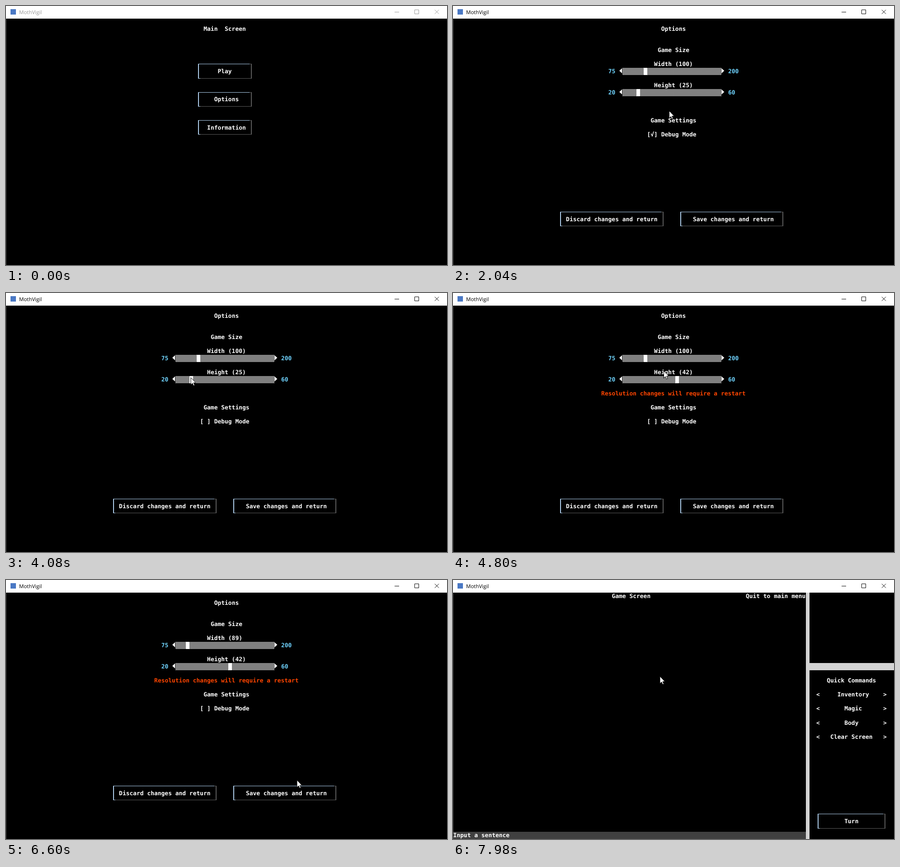
These frames come from a looping animation (976 by 574 pixels, 8000 ms). An HTML page:

```html
<!DOCTYPE html>
<html lang="en">
<head>
<meta charset="utf-8">
<title>Game options</title>
<style>
  html, body { margin: 0; width: 100%; height: 100%; overflow: hidden; background: #000; }
  svg { display: block; width: 976px; height: 574px; }
  .cell { font: bold 12.957px "DejaVu Sans Mono", monospace; white-space: pre; text-rendering: geometricPrecision; }
  .caption { font: 11.5px "Open Sans", sans-serif; text-rendering: geometricPrecision; }
  rect { shape-rendering: crispEdges; }
</style>
</head>
<body>
<svg id="stage" viewBox="0 0 976 574" xmlns="http://www.w3.org/2000/svg">
  <defs>
    <pattern id="shade" width="2" height="2" patternUnits="userSpaceOnUse">
      <path d="M0 0h1v1h-1zM1 1h1v1h-1z" fill="#fff" shape-rendering="crispEdges"/>
    </pattern>
  </defs>
  <rect width="976" height="574"/>
  <g id="screens"></g>
  <rect y="28" width="1" height="546" fill="#3a3a3a"/>
  <rect width="976" height="28" fill="#fff"/>
  <rect x="10" y="7" width="12" height="12" fill="#4a78c4"/>
  <g id="bar">
    <text class="caption" x="29" y="17.5">MothVigil</text>
    <path d="M860 13.5h10M904.5 8.5h9v9h-9zM949 8.5l9 9M958 8.5l-9 9" fill="none" stroke="currentColor"/>
  </g>
  <path id="cursor" d="M.5.5V16.5L4.2 13L6.5 18.5L9 17.5L6.7 12H11.5Z" fill="#fff" stroke="#000"/>
</svg>
<script>
const LOOP = 8000, STEP = 60;
const CW = 7.8, CH = 15.6, LEFT = 0.5, TOP = 28;
const LIGHT = '#b0d0ee', DIM = '#5c5c5c', CYAN = '#6fd3ff';
const $ = id => document.getElementById(id);
const colX = c => LEFT + c * CW;
const rowY = r => TOP + r * CH;

function add(parent, tag, attrs, content) {
  const el = document.createElementNS('http://www.w3.org/2000/svg', tag);
  for (const key in attrs) el.setAttribute(key, attrs[key]);
  if (content) el.textContent = content;
  parent.appendChild(el);
  return el;
}

function show(el, on) { el.style.display = on ? '' : 'none'; }

function label(g, col, row, str, fill = '#fff') {
  return add(g, 'text', { class: 'cell', x: colX(col), y: rowY(row) + 11.7, fill }, str);
}

function box(g, x, y, width, height, fill) {
  return add(g, 'rect', { x, y, width, height, fill });
}

// Bevelled button; returns a function that sets its pressed look.
function button(g, left, right, row, textCol, str) {
  const x1 = Math.round(colX(left) + 2.9), x2 = Math.round(colX(right) + 2.9);
  const y1 = Math.round(rowY(row - 1) + 6.8), y2 = Math.round(rowY(row + 1) + 6.8);
  const path = (d, width) => add(g, 'path', {
    d, 'stroke-width': width, fill: 'none', 'shape-rendering': 'crispEdges' });
  const lit = [
    path(`M${x1} ${y1 + .5}H${x2 - 3}M${x1} ${y2 + .5}h5`, 1),
    path(`M${x1 + 1} ${y1}V${y2 + 1}`, 2)];
  const dark = [
    path(`M${x2 - 3} ${y1 + .5}H${x2 + 2}M${x1 + 5} ${y2 + .5}H${x2 + 2}`, 1),
    path(`M${x2 + 1} ${y1}V${y2 + 1}`, 2)];
  label(g, textCol, row, str);
  return pressed => {
    lit.forEach(p => p.setAttribute('stroke', pressed ? DIM : LIGHT));
    dark.forEach(p => p.setAttribute('stroke', pressed ? LIGHT : DIM));
  };
}

// Slider with a 28-cell track; returns a function that sets its value.
function slider(g, row, name, min, max) {
  const title = label(g, 57, row - 1, '');
  const y = rowY(row), span = 28, first = 48;
  const arrow = (x, dir) => add(g, 'path', {
    d: `M${x} ${y + 6.4}l${6 * dir} -5.6v11.2z`, fill: '#fff' });
  label(g, 44, row, String(min), CYAN);
  label(g, 78, row, String(max), CYAN);
  arrow(colX(47) + 1, 1);
  arrow(colX(76) + 7, -1);
  box(g, Math.round(colX(first)), Math.round(y), 219, 16, 'url(#shade)');
  const thumb = box(g, 0, Math.round(y), 8, 16, '#fff');
  return value => {
    const pos = Math.round((value - min) / (max - min) * span);
    title.textContent = `${name} (${value})`;
    thumb.setAttribute('x', Math.round(colX(first + pos)));
  };
}

const [menu, options, game] = [0, 1, 2].map(() => add($('screens'), 'g', {}));

label(menu, 56, 1, 'Main  Screen');
const pressPlay = button(menu, 54, 69, 7, 60, 'Play');
const pressOptions = button(menu, 54, 69, 11, 59, 'Options');
button(menu, 54, 69, 15, 57, 'Information')(false);

label(options, 59, 1, 'Options');
label(options, 58, 4, 'Game Size');
const setWidth = slider(options, 7, 'Width', 75, 200);
const setHeight = slider(options, 10, 'Height', 20, 60);
const warning = label(options, 42, 12, 'Resolution changes will require a restart', '#ff4500');
label(options, 56, 14, 'Game Settings');
const hover = box(options, 430, 278, 117, 15, '#2c2c2c');
const debug = label(options, 55, 16, '');
button(options, 30, 59, 28, 32, 'Discard changes and return')(false);
const pressSave = button(options, 64, 93, 28, 68, 'Save changes and return');

label(game, 45, 0, 'Game Screen');
label(game, 83, 0, 'Quit to main menu');
box(game, 781, 28, 8, 546, '#d3d3d3');
box(game, 789, 184, 187, 16, '#d3d3d3');
box(game, 1, 558, 780, 16, '#404040');
label(game, 0, 34, 'Input a sentence');
label(game, 106, 12, 'Quick Commands');
[[109, 'Inventory'], [111, 'Magic'], [111, 'Body'], [107, 'Clear Screen']].forEach(([col, str], i) => {
  const row = 14 + 2 * i;
  label(game, 103, row, '<');
  label(game, col, row, str);
  label(game, 122, row, '>');
});
button(game, 103, 122, 32, 111, 'Turn')(false);

// Pointer way points: time, x, y
const route = [
  [120, 922, 64], [480, 650, 285], [900, 512, 212], [1080, 507, 204],
  [1560, 507, 204], [1740, 507, 214], [1860, 507, 214], [2040, 478, 232],
  [2340, 438, 280], [2700, 436, 278], [2940, 415, 193], [3120, 415, 193],
  [3180, 414.5, 192], [3480, 414, 188], [3600, 414, 188], [3780, 466, 188],
  [3960, 400, 188], [4080, 408.5, 187], [4200, 408.5, 187], [4500, 494, 189],
  [4680, 494, 189], [4980, 424, 147], [5100, 424, 147], [5280, 419, 144],
  [5460, 419, 144], [5700, 410.5, 144], [5820, 400, 144], [6000, 400, 146],
  [6300, 605, 336], [6600, 643.5, 443], [6720, 640, 466], [6960, 640, 466],
  [7140, 528, 217], [7320, 471, 139], [7920, 471, 139], [7980, 457.5, 213]];

function pointAt(t) {
  const i = route.findIndex(p => p[0] > t);
  if (i < 0) return route[route.length - 1].slice(1);
  const [t0, x0, y0] = route[i - 1], [t1, x1, y1] = route[i];
  const k = (t - t0) / (t1 - t0);
  return [x0 + (x1 - x0) * k, y0 + (y1 - y0) * k];
}

// Last value whose start time has passed
const latest = (t, list) => list.filter(e => e[0] <= t).pop()[1];
const within = (t, a, b) => t >= a && t < b;

function render(time) {
  const t = Math.floor(time % LOOP / STEP) * STEP;
  const screen = latest(t, [[0, menu], [1320, options], [7080, menu], [7860, game]]);
  [menu, options, game].forEach(g => show(g, g === screen));

  const ink = t < 960 ? '#999' : '#000';
  $('bar').setAttribute('fill', ink);
  $('bar').setAttribute('color', ink);

  pressOptions(within(t, 1080, 1320));
  pressSave(within(t, 6900, 7080));
  pressPlay(within(t, 7620, 7860));

  setWidth(latest(t, [[0, 100], [5640, 94], [5880, 89]]));
  setHeight(latest(t, [[0, 25], [4380, 33], [4560, 42]]));
  show(warning, t >= 4380);
  show(hover, within(t, 2460, 3180));
  debug.textContent = `[${t < 2700 ? '√' : ' '}] Debug Mode`;

  show($('cursor'), t >= 120);
  if (t >= 120) $('cursor').setAttribute('transform', `translate(${pointAt(t)})`);
}

const start = performance.now();
function tick() {
  render(performance.now() - start);
  requestAnimationFrame(tick);
}
tick();
</script>
</body>
</html>
```
